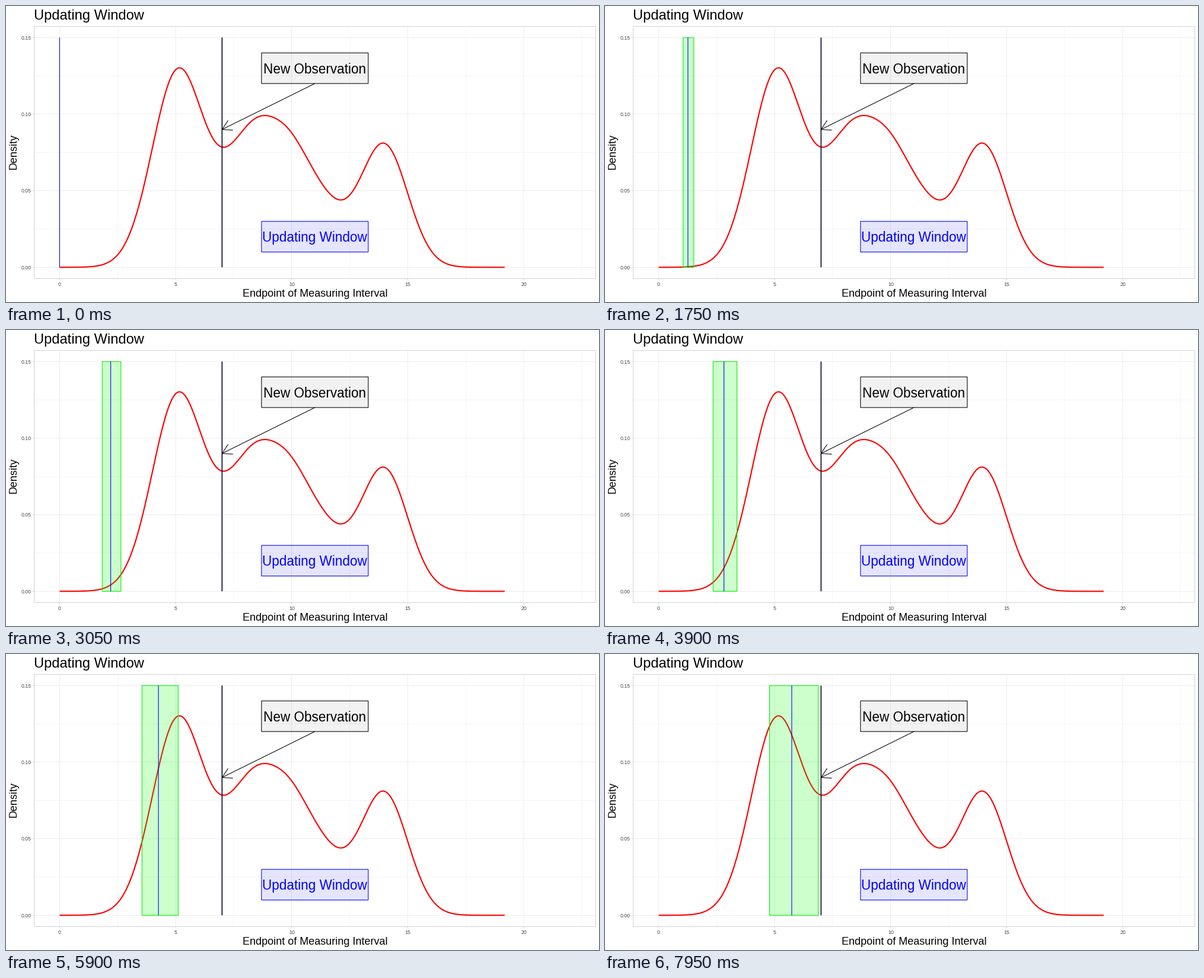
These frames come from a looping animation (1000 by 500 pixels, 8000 ms). A matplotlib script:

```python
import numpy as np
import matplotlib.pyplot as plt
from matplotlib.animation import FuncAnimation
from matplotlib.patches import Rectangle

W, H, DPI = 1000, 500, 72      # at 72 dpi one point is one pixel
FRAMES, STEP_MS = 160, 50
SPEED = 7 / 194                # axis units per frame
THIN, HALF, FAINT = 1.07, 0.53, 0.27

plt.rcParams["font.family"] = "Liberation Sans"
fig = plt.figure(figsize=(W / DPI, H / DPI), dpi=DPI, facecolor="white")
ax = fig.add_axes([0, 0, 1, 1])
ax.set_xlim(0, W)
ax.set_ylim(H, 0)
ax.axis("off")


def px(x):
    return 90.45 + 39.13 * x


def py(y):
    return 441.4 - 2587 * y


def line(xs, ys, color, width, z=1, cap="butt"):
    art, = ax.plot(xs, ys, color=color, lw=width, zorder=z, snap=False,
                   solid_capstyle=cap, solid_joinstyle="round")
    return art


def text(x, y, s, size, color="black", ha="center", rotation=0):
    ax.text(x, y, s, fontsize=size, color=color, ha=ha, va="baseline",
            rotation=rotation, rotation_mode="anchor", zorder=9)


def box(x0, x1, y0, y1, color, alpha, edge, z):
    """Translucent rectangle with an opaque outline; returns both patches."""
    corner, w, h = (px(x0), py(y1)), px(x1) - px(x0), py(y0) - py(y1)
    fill = Rectangle(corner, w, h, fc=color, ec="none", alpha=alpha,
                     zorder=z, snap=False)
    rim = Rectangle(corner, w, h, fc="none", ec=edge, lw=THIN,
                    zorder=z + 0.1, snap=False)
    ax.add_patch(fill)
    ax.add_patch(rim)
    return fill, rim


def bump(x, height, mean, sd):
    return height * np.exp(-((x - mean) / sd) ** 2 / 2)


def density(x):
    """Three modes; the middle one is broad and leans to the right."""
    return (bump(x, 0.126, 5.085, 1.105)
            + bump(x, 0.0839, 8.37, 1.329)
            + bump(x, 0.0054, 9.97, 0.613)
            + bump(x, 0.0491, 10.71, 1.354)
            + bump(x, 0.0784, 14.0, 1.01))


# Panel, grid and ticks
LEFT, RIGHT, TOP, BOTTOM = 47.5, 994.5, 34.5, 460.5
for i in range(5):
    x = px(5 * i)
    line([x, x], [TOP, BOTTOM], "#dedede", HALF)
    line([x, x], [BOTTOM, BOTTOM + 3], "#b3b3b3", HALF)
    text(x, 473, str(5 * i), 8.8, "#4d4d4d")
    x = px(5 * i + 2.5)
    line([x, x], [TOP, BOTTOM], "#dedede", FAINT)
for i in range(4):
    y = py(0.05 * i)
    line([LEFT, RIGHT], [y, y], "#dedede", HALF)
    line([LEFT - 3, LEFT], [y, y], "#b3b3b3", HALF)
    text(42.3, y + 3.2, f"{0.05 * i:.2f}", 8.8, "#4d4d4d", ha="right")
    if i < 3:
        y = py(0.05 * i + 0.025)
        line([LEFT, RIGHT], [y, y], "#dedede", FAINT)
ax.add_patch(Rectangle((LEFT, TOP), RIGHT - LEFT, BOTTOM - TOP, fc="none",
                       ec="#d3d3d3", lw=1, zorder=1.5, snap=False))

xs = np.linspace(0, 19.18, 900)
line(px(xs), py(density(xs)), "#ff0000", 2.13, z=2)

# Labels, arrow and the fixed observation
text(47, 23, "Updating Window", 23.65, ha="left")
text(521.5, 491, "Endpoint of Measuring Interval", 18)
text(17.5, 246, "Density", 18, rotation=90)

box(8.7, 13.3, 0.12, 0.14, "black", 0.05, "black", 3)
box(8.7, 13.3, 0.01, 0.03, "blue", 0.1, "blue", 3)
text(px(11), 114, "New Observation", 22.5)
text(px(11), 398, "Updating Window", 22.5, "blue")

tail, tip = np.array([px(11), py(0.12)]), np.array([px(7), py(0.09)])
line(*zip(tail, tip), "black", THIN, z=6)
back = np.arctan2(*(tail - tip)[::-1])
barbs = [tip + 18 * np.array([np.cos(back + t), np.sin(back + t)])
         for t in (-np.pi / 6, np.pi / 6)]
line(*zip(barbs[0], tip, barbs[1]), "black", THIN, z=6, cap="round")

SPAN = [py(0), py(0.15)]
line([px(7)] * 2, SPAN, "#00002c", 1.6, z=5)

# Moving window
window = box(0, 0, 0, 0.15, "#00ff00", 0.2, "#00ee00", 4)
marker = line([px(0)] * 2, SPAN, "blue", THIN, z=4.5)


def update(frame):
    pos = SPEED * frame
    lo, hi = px(pos / 1.2), px(pos * 1.2)
    for patch in window:
        patch.set_x(lo)
        patch.set_width(hi - lo)
    marker.set_xdata([px(pos)] * 2)
    return [*window, marker]


anim = FuncAnimation(fig, update, frames=FRAMES, interval=STEP_MS,
                     repeat=True, repeat_delay=0, blit=False)
plt.show()
```
